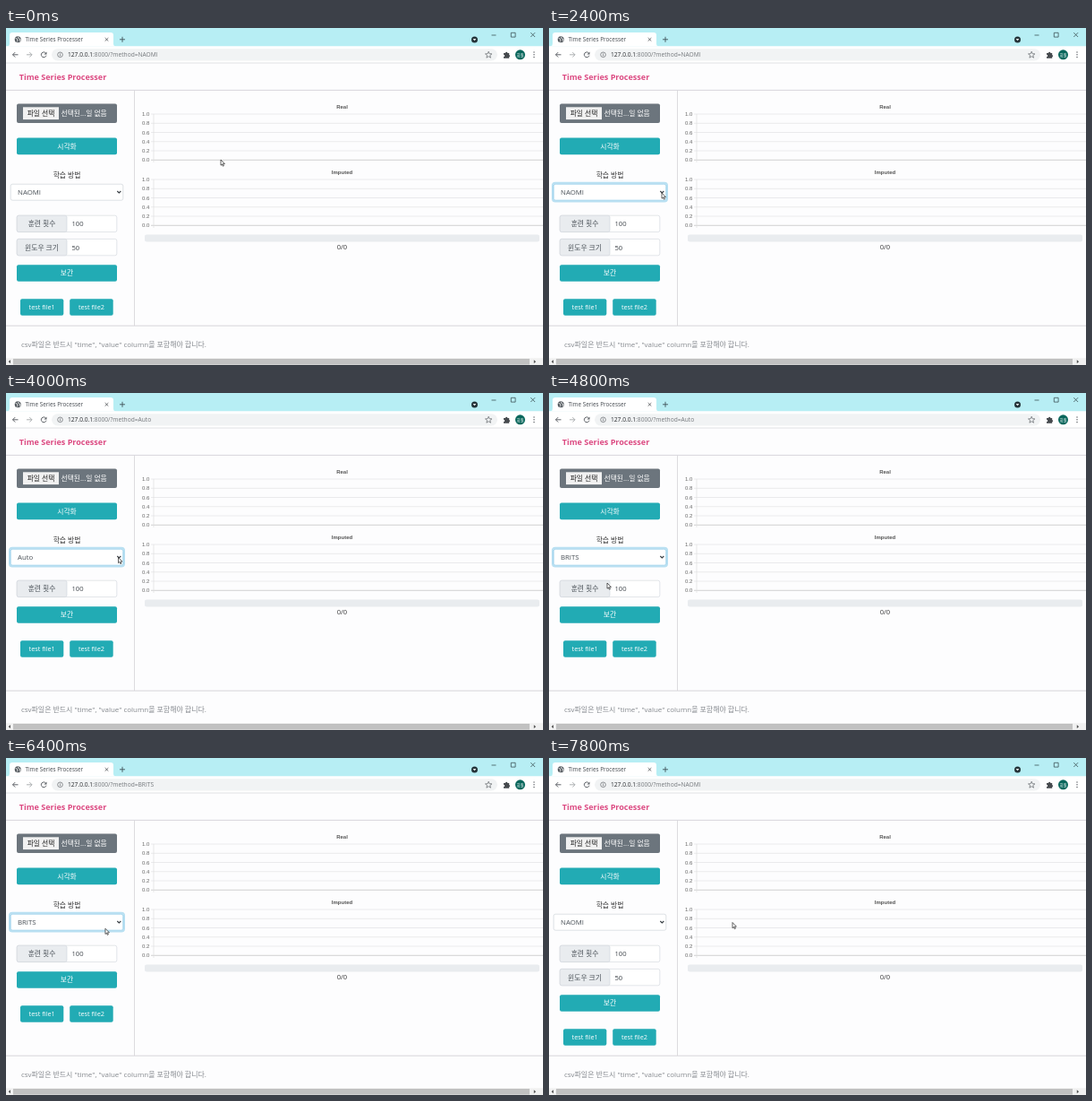
These frames come from a looping animation (600x376 px, 8 s). An HTML page:

```html
<!DOCTYPE html>
<html lang="ko">
<head>
<meta charset="utf-8">
<title>Time Series Processer</title>
<style>
  html, body { margin: 0; width: 100%; height: 100%; overflow: hidden; background: #fff; }
  svg { display: block; width: 100%; height: 100%; }
  text { font-family: "Open Sans", "Noto Sans CJK KR", "Noto Sans CJK", sans-serif; }
  .chart text { font-family: "Liberation Sans", Arial, sans-serif; }
</style>
</head>
<body>
<svg id="stage" viewBox="0 0 600 376"></svg>
<script>
const LOOP = 8000, STEP = 200;
const TEAL = '#22abb4', INK = '#40464c', ICON = '#5f6368';

const rect = (x, y, w, h, fill, extra = '') =>
  `<rect x="${x}" y="${y}" width="${w}" height="${h}" fill="${fill}" ${extra}/>`;
const line = (x1, y1, x2, y2, color, width = 0.7) =>
  `<path d="M${x1} ${y1}L${x2} ${y2}" stroke="${color}" stroke-width="${width}"/>`;
const stroke = (d, color = ICON, width = 1, extra = '') =>
  `<path d="${d}" fill="none" stroke="${color}" stroke-width="${width}" ${extra}/>`;
const text = (x, y, str, size = 7.8, fill = INK, extra = '') =>
  `<text x="${x}" y="${y}" font-size="${size}" fill="${fill}" ${extra}>${str}</text>`;
const centered = (x, y, str, size, fill, extra = '') =>
  text(x, y, str, size, fill, `text-anchor="middle" ${extra}`);
const button = (x, y, w, label, size = 7.8) =>
  rect(x, y, w, 18.6, TEAL, 'rx="2"') +
  centered(x + w / 2, y + 12.2, label, size, '#fff', 'font-weight="500"');
const cross = (x, y, r) => `M${x - r} ${y - r}l${2 * r} ${2 * r}m0 ${-2 * r}l${-2 * r} ${2 * r}`;

function numberField(y, label, value) {
  return rect(12.2, y, 111.6, 18.4, '#fff', 'rx="2" stroke="#ced4da" stroke-width=".6"') +
    rect(12.2, y, 55.8, 18.4, '#e9ecef', 'rx="2" stroke="#ced4da" stroke-width=".6"') +
    centered(40, y + 12.2, label, 7.8, '#495057') +
    text(73.5, y + 12.1, value, 7.6);
}

function chart(top, title) {
  let out = centered(375.5, top - 6, title, 6, '#555', 'font-weight="bold"');
  for (let i = 0; i <= 5; i++) {
    const y = top + i * 10.25;
    out += line(162, y, 600, y, i === 5 ? '#c4c4c6' : '#e6e6e8', 0.8) +
      text(160.3, y + 2.1, (1 - i / 5).toFixed(1), 6, '#666', 'text-anchor="end"');
  }
  return `<g class="chart">${out}${line(165, top, 165, top + 54, '#dedee0')}</g>`;
}

function browserFrame() {
  return rect(0, 0, 600, 20.5, '#b7eef4') +
    '<path d="M1 20.5q3 0 3-3V8q0-3 3-3H117q3 0 3 3v9.500q0 3 3 3z" fill="#fff"/>' +
    stroke(cross(112.500, 12.8, 1.8), '#484c50', 0.8) +
    stroke('M127 12.800h6m-3-3v6', '#42545a', 0.9) +
    '<circle cx="523.500" cy="13" r="3.500" fill="#24343a"/><path d="M521.700 12h3.600l-1.800 2.300z" fill="#fff"/>' +
    stroke('M542.500 8h5M564.300 5.300h4.800v4.800h-4.800z' + cross(588.7, 7.6, 2.4), '#35484d', 0.75) +
    rect(0, 20.5, 600, 18.5, '#fff') +
    stroke('M13.500 29.800H7.500m2.700-2.700l-2.700 2.700l2.700 2.700', ICON, 1) +
    stroke('M23 29.800h6m-2.700-2.700l2.700 2.700l-2.700 2.700', '#a4a7aa', 0.9) +
    rect(51, 23.2, 498, 13.2, '#f1f3f4', 'rx="6.6"') +
    '<circle cx="60.500" cy="29.800" r="2.800" fill="none" stroke="#5f6368" stroke-width=".7"/>' +
    stroke('M60.500 29.300v2M60.500 27.900v.7', ICON, 0.75) +
    stroke('M539.200 26.200l1 2.500 2.700.2-2.100 1.700.7 2.600-2.300-1.500-2.300 1.500.7-2.600-2.100-1.700 2.700-.2z', ICON, 0.7) +
    '<path d="M556 28h2a1.200 1.200 0 0 1 2.400 0h1.800v2a1.200 1.200 0 0 1 0 2.300v1.500h-6.200v-1.700a1.200 1.200 0 0 0 0-2.400z" fill="#464a4e"/>' +
    '<circle cx="574.500" cy="29.800" r="5.500" fill="#08665b"/>' + centered(574.5, 31.5, '회원', 4.4, '#fff') +
    [27, 29.8, 32.6].map(y => `<circle cx="590" cy="${y}" r=".75" fill="${ICON}"/>`).join('') +
    line(0, 39, 600, 39, '#d9dbdd', 0.8);
}

function pageFrame() {
  return rect(0, 39, 600, 329, '#fdfdfe') + browserFrame() +
    text(14.7, 58.2, 'Time Series Processer', 9.05, '#dc4a82', 'font-weight="bold"') +
    line(0, 69.4, 600, 69.4, '#d5d2d8', 0.9) + line(143.5, 69.4, 143.5, 332, '#d9d7dc', 0.9) +
    line(0, 332.2, 600, 332.2, '#d3d1d6', 0.9) +
    rect(12, 84.6, 112, 21.4, '#6c757d', 'rx="2"') + rect(19, 88.3, 40, 13.8, '#f1f1f1') +
    centered(39, 98.1, '파일 선택', 7.8, '#222') + text(61.5, 98.1, '선택된...일 없음', 7.8, '#fff') +
    button(12, 122.6, 112, '시각화') + centered(68, 167, '학습 방법', 7.8, '#333') +
    chart(96, 'Real') + chart(169, 'Imputed') +
    rect(155, 230.5, 441, 8, '#e9ecef', 'rx="2"') + centered(375.5, 246.8, '0/0', 7.5, '#333') +
    text(17, 356, 'csv파일은 반드시 "time", "value" column을 포함해야 합니다.', 7.95, '#85898e') +
    rect(0, 368.3, 600, 7.7, '#f1f1f1') + rect(8, 369, 577, 6.6, '#c1c1c1') +
    '<path d="M5 370.300v4l-2.300-2zM589.800 370.300v4l2.300-2z" fill="#555"/>';
}

function tabAndAddress({ url, loading }, t) {
  const path = `127.0.0.1:8000/?method=${url}`;
  const angle = t / 1000 * Math.PI * 2 - Math.PI / 2;
  const icon = loading
    ? `<circle cx="${13 + 2.8 * Math.cos(angle)}" cy="${12.8 + 2.8 * Math.sin(angle)}" r=".7" fill="#777"/>`
    : '<circle cx="13.200" cy="12.800" r="3.500" fill="#555b60"/>' +
      stroke('M10.500 11.300l2 .8.500 2-1 1.500M14 9.800l-.3 1.500 2.300 1.500-.8 2', '#fff', 0.8);
  const reload = loading
    ? stroke(cross(42.3, 29.8, 2.4), ICON, 1)
    : stroke('M44.500 28a2.900 2.900 0 1 0 .5 2.700', ICON, 1) + '<path d="M45.500 26.500v3h-3z" fill="#5f6368"/>';
  return icon + reload +
    `<g clip-path="url(#tabClip)">${text(21.5, 15, loading ? path : 'Time Series Processer', 6.35, '#454a50')}</g>` +
    (loading ? rect(97, 6, 11, 13, 'url(#fade)') : '') +
    text(69, 32.2, `127.0.0.1<tspan fill="#74787c">${path.slice(9)}</tspan>`, 6.65, '#292c30');
}

function methodSelect({ method, focus }) {
  const ring = focus ? rect(4, 172.8, 128, 20.6, 'none', 'rx="3" stroke="#b9e0f2" stroke-width="2"') : '';
  return ring +
    rect(5.2, 174.2, 125.6, 18, '#fff', `rx="2" stroke="${focus ? '#80c4e6' : '#ced4da'}" stroke-width=".7"`) +
    text(13, 186.1, method, 7.8, '#495057') +
    stroke('M124.300 182l2 2 2-2', '#343a40', 1.1);
}

function trainingForm({ url }) {
  const hasWindow = url === 'NAOMI';
  const shift = hasWindow ? 0 : -26;
  return numberField(209.2, '훈련 횟수', '100') +
    (hasWindow ? numberField(235.4, '윈도우 크기', '50') : '') +
    button(12, 264.2 + shift, 112, '보간') +
    button(16, 302.2 + shift, 48.3, 'test file1', 7.3) +
    button(71.2, 302.2 + shift, 48.5, 'test file2', 7.3);
}

// Each entry changes part of the page from its time on.
const events = [
  [0, { method: 'NAOMI', url: 'NAOMI', focus: false, loading: false }],
  [2400, { focus: true }],
  [3000, { method: 'Auto' }],
  [3400, { loading: true }],
  [3600, { url: 'Auto', focus: false, loading: false }],
  [4000, { focus: true }],
  [4800, { method: 'BRITS' }],
  [5000, { loading: true }],
  [5200, { url: 'BRITS', focus: false, loading: false }],
  [6200, { focus: true }],
  [6800, { method: 'NAOMI' }],
  [7000, { loading: true }],
  [7200, { url: 'NAOMI', focus: false, loading: false }]
];
const pointerPath = [
  [0, 240, 147], [1400, 214.5, 235], [2400, 126, 184], [3000, 75, 202], [3200, 92, 198.5],
  [4000, 125.5, 183.5], [4800, 65, 212], [5600, 133.5, 205], [6200, 126, 184],
  [6800, 68, 208], [7000, 90.5, 208.5], [7800, 205, 183.5], [8000, 212, 182]
];

const stateAt = t => Object.assign({}, ...events.filter(e => e[0] <= t).map(e => e[1]));

function pointerAt(t) {
  const i = pointerPath.findIndex(p => p[0] > t);
  const [t0, x0, y0] = pointerPath[i - 1], [t1, x1, y1] = pointerPath[i];
  const u = (t - t0) / (t1 - t0), k = u * u * (3 - 2 * u);
  return [x0 + (x1 - x0) * k, y0 + (y1 - y0) * k];
}

document.getElementById('stage').innerHTML =
  `<defs><clipPath id="tabClip"><rect x="20" y="5" width="87" height="15"/></clipPath>
   <linearGradient id="fade"><stop stop-color="#fff" stop-opacity="0"/><stop offset="1" stop-color="#fff"/></linearGradient></defs>` +
  pageFrame() + '<g id="live"></g>' +
  '<path id="pointer" d="M0 0v6.200l1.400-1.200 1 2.200 1-.5-1-2.100h2z" fill="#fff" stroke="#222" stroke-width=".7"/>';

const live = document.getElementById('live');
const pointer = document.getElementById('pointer');
const start = performance.now();
let shown = -1;

function draw() {
  const t = Math.floor((performance.now() - start) % LOOP / STEP) * STEP;
  if (t !== shown) {
    shown = t;
    const state = stateAt(t);
    live.innerHTML = tabAndAddress(state, t) + methodSelect(state) + trainingForm(state);
    pointer.setAttribute('transform', `translate(${pointerAt(t)})`);
  }
  requestAnimationFrame(draw);
}
draw();
</script>
</body>
</html>
```
